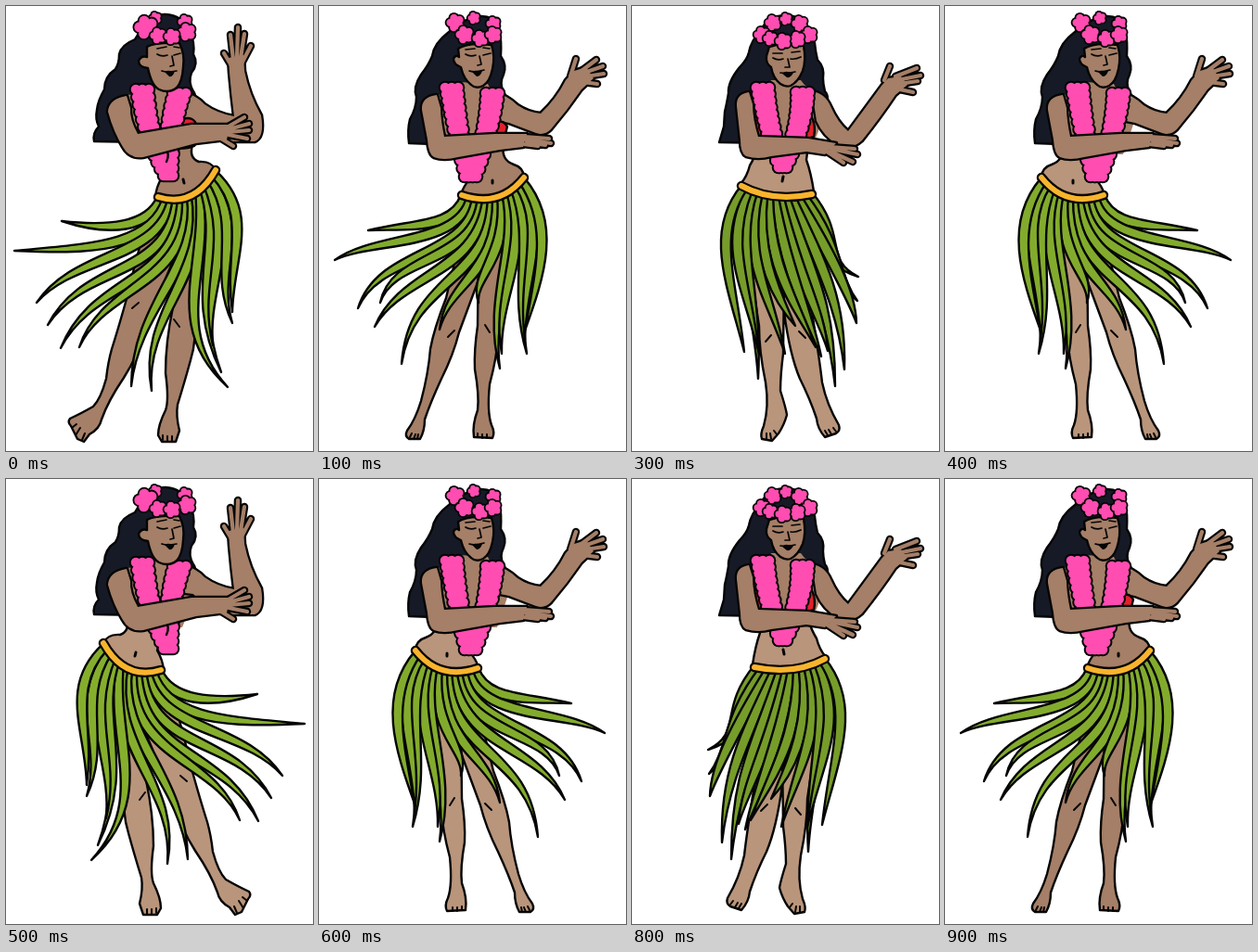
These frames come from a looping animation (331 by 480 pixels, 1000 ms). An HTML page with a canvas:

```html
<!DOCTYPE html>
<html lang="en">
<head>
<meta charset="utf-8">
<title>Hula dancer</title>
<style>
html, body { margin: 0; width: 100%; height: 100%; overflow: hidden; background: #fff; }
canvas { display: block; }
</style>
</head>
<body>
<canvas id="stage" width="331" height="480"></canvas>
<script>
const ctx = document.getElementById('stage').getContext('2d');
const INK = '#050505', HAIR = '#161a26', PINK = '#ff4db1', RED = '#e3202c', GOLD = '#f9b42d';
const TAN = '#a57f67', LIGHT = '#b9957b';
ctx.lineCap = ctx.lineJoin = 'round';

// Chest, arms and head, from the arms-up pose to the centre pose
const uppers = [{
  hair: 'M139 36Q124 42 122 52Q122 62 118 68Q106 76 106 90Q99 102 98 112Q96 122 100 130Q93 137 95 146L150 147L200 112Q207 98 202 92Q196 82 200 72Q208 62 202 52Q204 40 198 26Q190 10 172 9Q155 8 139 36Z',
  torso: 'M128 96Q150 96 152 84L184 84Q186 92 200 97L204 125L190 160L135 160L122 125Z',
  bra: 'M190 122Q203 118 206 130Q208 145 203 151Q194 155 187 153Z',
  armR: 'M190 92Q206 97 214 106Q228 116 246 119Q243 95 241 72L240 56L256 53L257 70Q262 95 275 118Q279 142 268 146L240 146Q215 140 202 124L185 122Z',
  handR: 'M244 66L235 51M245 58L242 31M249 56L250 23M253 56L257 30M253 64L264 43',
  armL: 'M130 97Q111 100 110 114Q116 136 126 152Q133 165 148 163L205 148L238 144L242 128L200 128L142 138Q133 122 134 110Z',
  handL: 'M238 131L257 120M240 133L262 127M240 136L262 134M240 139L260 143M232 143L245 151',
  lei: [[147, 90, 152, 140, 174, 183], [187, 94, 174, 135, 176, 183]],
  fold: 'M172 153Q177 160 173 168',
  face: 'M152 44Q160 39 187 40Q193 52 191 66Q190 82 184 88Q176 95 165 90Q157 86 153 67Q143 66 143 59Q146 53 152 55Z',
  lines: 'M163 52Q168 55 174 53M181 53L188 51M163 46L173 44M181 44L187 45M179 54L181 64L177 65M168 70Q173 72 184 70',
  lips: 'M171 71Q174 69 177 70L182 70Q180 77 176 76Z',
  flowers: [[161, 13, 6], [193, 17, 7], [195, 28, 9], [151, 23, 12], [164, 32, 8], [179, 33, 8]]
}, {
  hair: 'M140 28Q124 40 122 54Q118 64 110 74Q101 88 105 98Q105 110 98 122Q95 134 97 148L150 150L200 112Q205 102 199 92Q194 84 199 74Q203 64 196 54Q198 22 187 14Q168 4 140 28Z',
  torso: 'M125 96Q148 95 151 82L182 84Q184 92 200 97L204 125L192 160L135 160L120 125Z',
  bra: 'M188 125Q199 122 203 130L200 142L187 150Z',
  armR: 'M188 92Q204 97 214 107Q226 115 239 116Q256 100 266 80L275 70L288 66L296 78L283 90Q268 112 250 133Q243 140 234 137L205 126L185 122Z',
  handR: 'M271 76L277 57M283 70L299 58M286 72L306 65M288 76L307 73M284 82L300 84',
  armL: 'M127 96Q110 98 111 112L117 144Q118 160 124 163Q134 167 150 163L195 155L220 152L224 138L190 138L135 141Q131 122 131 110Z',
  handL: 'M222 141L248 143M222 144L250 148M224 147L244 150M220 149L236 151',
  lei: [[143, 88, 148, 130, 161, 184], [187, 94, 184, 135, 166, 184]],
  face: 'M150 46Q160 39 186 42Q190 54 187 68Q184 82 177 86Q169 90 164 85Q156 79 153 66Q145 63 145 57Q147 52 151 55Z',
  lines: 'M158 52Q163 55 169 53M177 53L185 51M158 47L168 46M177 45L184 46M173 54L175 63L171 64M162 70Q168 72 178 69',
  lips: 'M165 71Q168 69 170 70L176 70Q174 76 170 76Z',
  flowers: [[167, 13, 6], [188, 19, 7], [147, 18, 9], [157, 31, 9], [174, 35, 8], [188, 31, 8]]
}, {
  hair: 'M140 24Q128 38 126 50Q124 58 116 66Q103 82 104 94Q102 106 100 114L99 130L94 147L150 148L208 112Q214 98 208 92Q206 84 206 78Q208 66 200 58Q198 50 197 40Q190 10 166 10Q148 10 140 24Z',
  torso: 'M125 92Q146 92 150 80L182 80Q188 90 205 95L201 135L192 158L138 160L118 125Z',
  bra: 'M128 122L137 118L146 142L131 143ZM184 120L193 118Q199 130 196 141L184 145Z',
  armR: 'M194 92Q208 94 214 108Q222 126 233 135Q250 112 269 86L276 78L290 76L297 85L284 96Q268 120 248 145Q236 156 222 150Q206 140 199 124Z',
  handR: 'M272 80L278 65M284 76L307 67M286 80L311 75M288 84L308 81M284 89L303 93',
  armL: 'M126 93Q112 95 113 108L117 145Q117 159 123 162Q136 166 150 162L188 157L208 160L220 148L190 143L136 141Q130 122 130 106Z',
  handL: 'M214 152L240 154M214 154L243 160M214 157L238 168M210 157L228 169',
  lei: [[141, 88, 146, 130, 162, 174], [184, 93, 184, 130, 163, 174]],
  face: 'M148 44Q165 38 185 43Q188 58 184 70Q179 82 171 86Q166 88 160 84Q152 78 150 66Q144 62 145 54Z',
  lines: 'M152 56Q157 59 163 57M171 57Q176 58 182 55M152 51L162 51M172 50L181 49M168 57L170 66L165 66M160 72Q167 73 176 71',
  lips: 'M162 73Q165 70 168 71L174 72Q171 78 167 77Z',
  flowers: [[152, 18, 8], [166, 14, 6], [181, 19, 8], [140, 31, 8], [191, 31, 8], [149, 35, 7], [178, 36, 8], [163, 38, 8]]
}];

// Waist, legs and skirt; each strand is two control points and a tip
const lowers = [{
  green: '#85ae2d',
  legs: 'M150 240Q138 280 133 305Q122 345 114 370Q110 384 108 402Q102 424 94 432Q80 440 69 445Q66 449 70 453L77 467L84 470L90 462Q101 456 103 446Q110 426 127 401Q143 376 149 350L180 275L190 235ZM180 255Q179 300 180 325Q172 362 172 396Q176 425 172 436Q164 452 164 463L168 470L183 470L187 458Q183 442 185 430Q193 404 199 382Q206 360 203 330L212 250Z',
  marks: 'M136 326L143 320M181 338L187 346M71 455L76 451M75 463L80 455M82 468L85 461M169 468V463M174 469V464M179 469V464',
  waist: 'M160 150L168 185Q162 195 161 206L190 212L227 178Q222 167 208 168Q197 164 201 150L202 130L165 125Z',
  navel: 'M191 187L192 191',
  band: [164, 206, 203, 218, 226, 177],
  strands: [[155, 240, 110, 243, 60, 232], [158, 262, 85, 262, 9, 264], [165, 275, 75, 265, 33, 320],
    [175, 295, 85, 275, 45, 344], [185, 305, 95, 290, 59, 369], [200, 300, 105, 300, 79, 368],
    [212, 280, 140, 320, 135, 410], [222, 290, 145, 330, 157, 415], [220, 280, 172, 345, 239, 411],
    [238, 260, 195, 310, 232, 395], [248, 260, 212, 300, 223, 366], [258, 240, 222, 285, 244, 342],
    [268, 225, 240, 270, 244, 330]]
}, {
  green: '#82ab2d',
  legs: 'M156 240Q145 280 137 315Q124 348 120 370Q118 396 110 426Q104 446 95 458Q92 464 97 467L109 467Q114 458 114 446Q120 428 132 402Q145 376 151 352L174 290L188 235ZM172 255L171 345Q167 372 168 392Q173 420 171 436Q165 452 167 465L187 466Q190 460 186 452Q181 438 184 408Q192 378 193 356L204 250Z',
  marks: 'M139 357L146 350M179 344L184 352M98 465L100 461M102 467L104 462M106 467L107 462M171 465V461M176 466V462M181 466V462',
  waist: 'M158 150L163 186Q156 194 153 203L188 210L221 184Q220 174 210 171Q196 166 199 150L200 130L160 125Z',
  navel: 'M187 188L187 191',
  band: [154, 204, 195, 218, 221, 185],
  strands: [[146, 240, 105, 235, 53, 242], [152, 260, 60, 248, 17, 274], [160, 275, 65, 263, 42, 326],
    [168, 280, 80, 266, 66, 320], [172, 290, 90, 285, 60, 346], [185, 300, 100, 290, 89, 386],
    [195, 290, 140, 295, 130, 349], [205, 270, 165, 290, 172, 320], [218, 260, 180, 320, 195, 391],
    [228, 260, 190, 310, 197, 375], [236, 255, 208, 305, 224, 375], [248, 240, 218, 290, 222, 360],
    [255, 235, 238, 290, 222, 350]]
}, {
  green: '#769c2a',
  legs: 'M132 330Q124 380 121 406Q116 430 103 452Q101 458 106 461L118 465Q126 456 127 445Q134 424 145 402Q156 376 162 330L170 260ZM162 290L163 375Q166 398 166 415Q160 434 159 441Q162 452 168 461L175 469L186 467Q188 462 184 453Q178 432 182 406Q189 372 189 345L202 260Z',
  marks: 'M139 358L146 351M176 355L182 362M106 459L109 455M111 462L114 457M115 463L118 458M170 462L173 458M176 467L177 461M181 467L181 461',
  waist: 'M136 150L138 166Q133 180 130 200L170 209L209 192Q202 184 199 172Q194 164 190 152Z',
  navel: 'M163 184L164 189',
  band: [132, 203, 175, 212, 208, 194],
  strands: [[100, 250, 125, 275, 82, 292], [103, 260, 110, 290, 83, 318], [112, 270, 90, 310, 84, 342],
    [122, 280, 100, 320, 97, 392], [135, 290, 112, 320, 107, 410], [150, 290, 122, 330, 115, 372],
    [162, 280, 137, 330, 122, 378], [180, 280, 150, 320, 128, 368], [195, 270, 166, 320, 150, 345],
    [208, 270, 178, 310, 161, 375], [218, 260, 190, 310, 190, 402], [228, 260, 202, 300, 189, 375],
    [242, 245, 218, 300, 205, 373]]
}];

function line(d, width = 2.4, color = INK) {
  ctx.lineWidth = width;
  ctx.strokeStyle = color;
  ctx.stroke(new Path2D(d));
}

function fill(d, color) {
  ctx.fillStyle = color;
  ctx.fill(new Path2D(d));
}

function shape(d, color) {
  fill(d, color);
  line(d);
}

function disc(x, y, r, color) {
  ctx.fillStyle = color;
  ctx.beginPath();
  ctx.arc(x, y, r, 0, 7);
  ctx.fill();
}

function quad([x0, y0, x1, y1, x2, y2], t) {
  const u = 1 - t, mix = (a, b, c) => u * u * a + 2 * u * t * b + t * t * c;
  return [mix(x0, x1, x2), mix(y0, y1, y2)];
}

// One outline around arm and fingers together
function arm(d, fingers) {
  line(fingers, 8.5);
  line(d, 4.6);
  line(fingers, 4.2, TAN);
  fill(d, TAN);
}

function lei(strings) {
  for (const [grow, color] of [[2, INK], [0, PINK]])
    for (const s of strings)
      for (let i = 0; i <= 12; i++) {
        const t = i / 12, [x, y] = quad(s, t), w = 7 - 3 * t;
        for (const dx of [-w, 0, w]) disc(x + dx, y, 5.3 + grow, color);
      }
}

function flower([x, y, r]) {
  for (const [grow, color] of [[1.8, INK], [0, PINK]]) {
    for (let i = 0; i < 5; i++) {
      const a = i * Math.PI * 0.4 - 0.6;
      disc(x + r * 0.6 * Math.cos(a), y + r * 0.6 * Math.sin(a), r * 0.46 + grow, color);
    }
    disc(x, y, r * 0.5, color);
  }
}

function strand([x, y], [ax, ay, bx, by, tx, ty], color) {
  const side = (dx, dy, w) => {
    const k = w / Math.hypot(dx, dy);
    return [-dy * k, dx * k];
  };
  const [sx, sy] = side(ax - x, ay - y, 3.8);
  const [px, py] = side(bx - x, by - y, 7.5);
  const [qx, qy] = side(tx - ax, ty - ay, 5.5);
  shape(`M${x + sx} ${y + sy}C${ax + px} ${ay + py} ${bx + qx} ${by + qy} ${tx} ${ty}` +
    `C${bx - qx} ${by - qy} ${ax - px} ${ay - py} ${x - sx} ${y - sy}Z`, color);
}

function drawLower(p, skin) {
  shape(p.legs, skin);
  line(p.marks, 2);
  shape(p.waist, skin);
  line(p.navel, 3);
  p.strands.forEach((s, i) => strand(quad(p.band, (i + 0.4) / p.strands.length), s, p.green));
  const [x0, y0, x1, y1, x2, y2] = p.band, band = `M${x0} ${y0}Q${x1} ${y1} ${x2} ${y2}`;
  line(band, 10.5);
  line(band, 6, GOLD);
}

function drawUpper(p, showBra) {
  fill(p.torso, TAN);
  arm(p.armR, p.handR);
  if (showBra) shape(p.bra, RED);
  lei(p.lei);
  if (p.fold) line(p.fold);
  arm(p.armL, p.handL);
  shape(p.face, TAN);
  line(p.lines, 1.7);
  fill(p.lips, INK);
  p.flowers.forEach(flower);
}

// The hips swing right as mirror images of the left-hand poses
const mirrorSum = [331, 325, 326];

function draw(now) {
  const i = Math.floor(now / 100) % 10, step = i < 6 ? i : 10 - i;
  const flipped = step > 2, pose = flipped ? 5 - step : step;
  const up = uppers[pose];
  ctx.fillStyle = '#fff';
  ctx.fillRect(0, 0, 331, 480);
  shape(up.hair, HAIR);
  ctx.save();
  if (flipped) ctx.transform(-1, 0, 0, 1, mirrorSum[pose], 0);
  drawLower(lowers[pose], step < 2 ? TAN : LIGHT);
  ctx.restore();
  drawUpper(up, step < 4);
}

let start;
function tick(now) {
  start ??= now;
  draw(now - start);
  requestAnimationFrame(tick);
}
draw(0);
requestAnimationFrame(tick);
</script>
</body>
</html>
```
